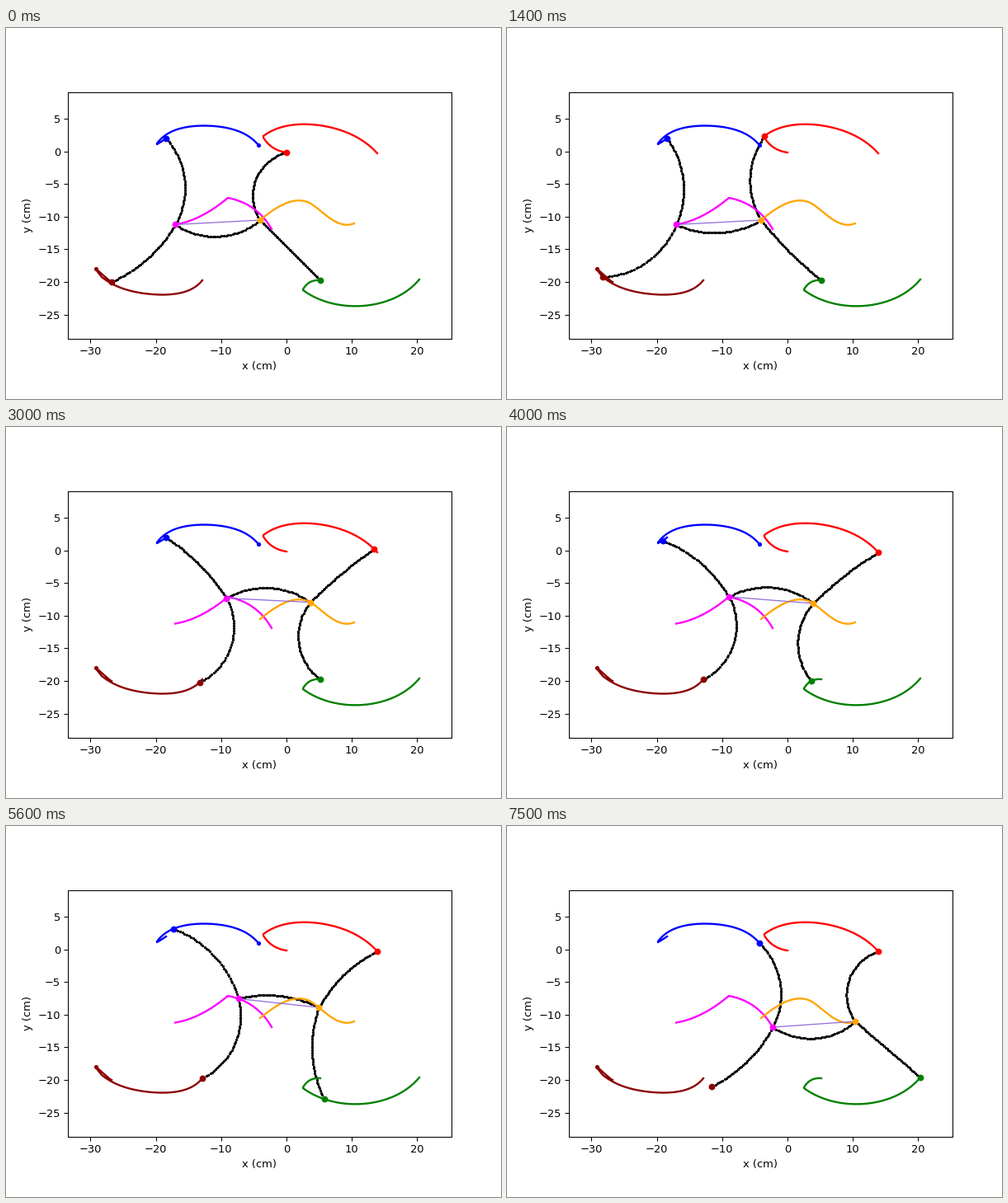
Animation of 600x450 px, one loop 7600 ms. Source, as a matplotlib script:

```python
import numpy as np
import matplotlib.pyplot as plt
from matplotlib.animation import FuncAnimation

W, H, DPI = 600, 450, 93.75
FRAMES, INTERVAL = 76, 100
LEFT, RIGHT, TOP, BOTTOM = 75, 540, 77.6, 377
SCALE, X0, Y0 = 7.92, 340, 149.6
N = 80  # samples per curve


def cm(p):
    """Stage pixels to centimetres."""
    p = np.asarray(p, float)
    return (p[..., 0] - X0) / SCALE, (Y0 - p[..., 1]) / SCALE


def ease(u):
    u = np.clip(u, 0, 1)
    return u * u * (3 - 2 * u)


def curve(points):
    """Polynomial through a few points, spaced by their distance."""
    p = np.array(points, float)
    s = np.r_[0, np.cumsum(np.hypot(*np.diff(p, axis=0).T))]
    s /= s[-1]
    coef = np.polyfit(s, p, len(p) - 1)
    return np.vander(np.linspace(0, 1, N), len(p)) @ coef


def arc(a, b, sag, n=42):
    """Circular arc from a to b; sag is the signed bulge in pixels."""
    d = b - a
    chord = np.hypot(*d)
    e = d / chord
    normal = np.array([-e[1], e[0]])
    half = 2 * np.arctan(2 * sag / chord)
    if abs(half) < 1e-3:
        return a + np.linspace(0, 1, n)[:, None] * d
    r = chord / (2 * np.sin(half))
    th = np.linspace(-half, half, n)[:, None]
    return (a + b) / 2 + r * np.sin(th) * e + r * (np.cos(th) - np.cos(half)) * normal


# The gait: front legs curl and stride, then the other pair does the same.
PHASES = [(0, 11), (14, 18), (34, 12), (51, 18)]
frames = np.arange(FRAMES)
progress = [ease((frames - start) / length) for start, length in PHASES]
gait = sum(progress)


class Marker:
    """A tracked point that runs through two curves, one in each given phase."""

    def __init__(self, color, phases, first, second):
        self.color = color
        self.trail = np.vstack([curve(first), curve(second)])
        t = np.r_[np.linspace(0, 1, N), np.linspace(1, 2, N)]
        q = sum(progress[k] for k in phases)
        self.pos = np.column_stack([np.interp(q, t, v) for v in self.trail.T])


blue = Marker("blue", (2, 3),
              [(194, 134), (188, 138), (183, 141)],
              [(183, 140), (200, 126), (241, 118.5), (285, 126.5), (306, 142)])
red = Marker("red", (0, 1),
             [(340, 151), (322, 144), (312, 133)],
             [(312, 131), (335, 120), (370, 117), (415, 127.5), (450, 152)])
brown = Marker("darkred", (0, 1),
               [(128, 308), (117, 299), (109, 292), (116, 302)],
               [(116, 302), (148, 318), (188, 323.5), (222, 318), (238, 306)])
green = Marker("green", (2, 3),
               [(381, 306), (369, 308), (360, 317)],
               [(360, 318), (388, 332), (427, 337.3), (472, 327), (501, 305)])
pink = Marker("magenta", (1, 3),
              [(205, 238.5), (225, 233), (247, 222), (269, 206)],
              [(269, 206), (300, 219), (322, 244)])
gold = Marker("orange", (1, 3),
              [(308, 233), (335, 214.5), (357, 209.3), (371, 214)],
              [(371, 214), (393, 231), (410, 238.5), (422, 237)])
MARKERS = [blue, red, brown, green, pink, gold]

# the loaded hind foot slips at the end of the last stride
brown.pos += 10 * ease((frames - 64) / 10)[:, None]

# bulge of each limb at the start of each phase
LIMBS = [(pink, gold, (17, 12.5, -16, -15)),
         (blue, pink, (-17, -14, -5, -13)),
         (pink, brown, (-8, -16, -23, -21)),
         (gold, red, (-23, -15.5, -2, -4)),
         (gold, green, (0, 3, 21, 14))]
bends = [np.interp(gait, range(5), sags + sags[:1]) for _, _, sags in LIMBS]

fig = plt.figure(figsize=(W / DPI, H / DPI), dpi=DPI, facecolor="white")
ax = fig.add_axes([LEFT / W, 1 - BOTTOM / H, (RIGHT - LEFT) / W, (BOTTOM - TOP) / H])
ax.set_xlim(*cm([(LEFT, 0), (RIGHT, 0)])[0])
ax.set_ylim(*cm([(0, BOTTOM), (0, TOP)])[1])
ax.set_xticks(range(-30, 21, 10))
ax.set_yticks(range(-25, 6, 5))
ax.set_xlabel("x (cm)")
ax.set_ylabel("y (cm)")

for m in MARKERS:
    ax.plot(*cm(m.trail), color=m.color, lw=1.8, zorder=3)
for m, k in [(blue, -1), (brown, N * 2 // 3)]:
    ax.plot(*cm(m.trail[k]), "o", color=m.color, ms=4, mew=0, zorder=3)

limbs = [ax.plot([], [], "o", color="black", ms=2.5, mew=0, zorder=2)[0] for _ in LIMBS]
link, = ax.plot([], [], color="mediumpurple", lw=1, zorder=4)
dots = [ax.plot([], [], "o", color=m.color, ms=6, mew=0, zorder=5)[0] for m in MARKERS]


def update(i):
    for line, (a, b, _), bend in zip(limbs, LIMBS, bends):
        line.set_data(*cm(arc(a.pos[i], b.pos[i], bend[i])))
    link.set_data(*cm([pink.pos[i], gold.pos[i]]))
    for dot, m in zip(dots, MARKERS):
        dot.set_data(*cm([m.pos[i]]))
    return [*limbs, link, *dots]


anim = FuncAnimation(fig, update, frames=FRAMES, interval=INTERVAL,
                     repeat=True, repeat_delay=0)
plt.show()
```
